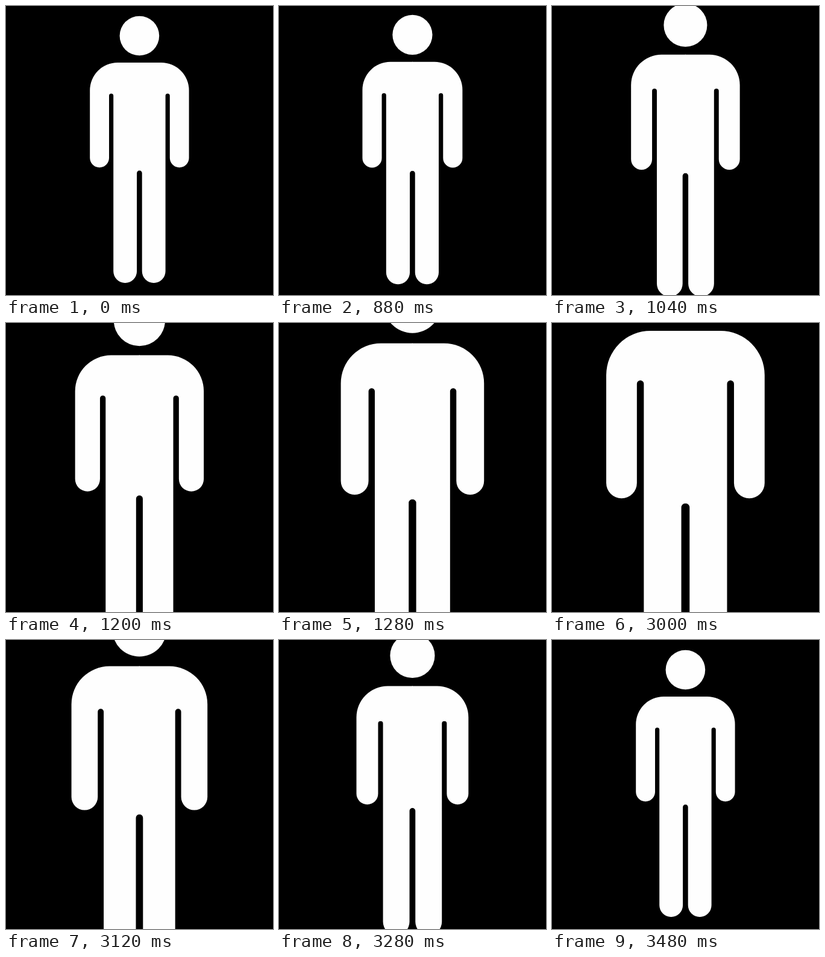
An HTML page with a canvas that plays this animation: 443x480 px, repeating every 4320 ms.

```html
<!DOCTYPE html>
<html lang="en">
<head>
<meta charset="utf-8">
<title>Figure zoom</title>
<style>
  html, body { margin: 0; width: 100%; height: 100%; overflow: hidden; background: #000; }
  canvas { display: block; width: 100vw; height: 100vh; }
</style>
</head>
<body>
<canvas id="stage" width="443" height="480"></canvas>
<script>
const canvas = document.getElementById('stage');
const ctx = canvas.getContext('2d');
const LOOP = 4320, STEP = 40, STEPS = 13;
const ZOOM_IN = 880, ZOOM_OUT = 3000;
const MAX_SCALE = 1.628;
const CENTER = { x: 221.4, y: 229.7 };

const easeIn = n => n >= STEPS ? 1 : Math.pow(0.08 + 0.0706 * n, 2.22);
const easeOut = n => n >= STEPS ? 1 : Math.sin((0.03 + 0.0789 * (n - 1)) * Math.PI / 2);

function zoomAt(time) {
  const t = Math.floor(time / STEP) * STEP;
  const stepsFrom = start => (t - start) / STEP + 1;
  if (t < ZOOM_IN) return 0;
  if (t < ZOOM_OUT) return easeIn(stepsFrom(ZOOM_IN));
  return 1 - easeOut(stepsFrom(ZOOM_OUT));
}

// Half of the body, mirrored by side; x is measured from the centre line.
function halfBody(side) {
  const arc = (x, y, r, from, to, ccw) =>
    side > 0 ? ctx.arc(x, y, r, from, to, ccw)
             : ctx.arc(-x, y, r, Math.PI - from, Math.PI - to, !ccw);
  const line = (x, y) => ctx.lineTo(side * x, y);
  const PI = Math.PI;

  ctx.beginPath();
  ctx.moveTo(-side * 0.5, 94.1);
  line(36.2, 94.1);
  arc(36.2, 140.1, 46, -PI / 2, 0, false);
  line(82.2, 252.3);
  arc(66.3, 252.3, 15.9, 0, PI, false);
  line(50.4, 149.2);
  arc(46.8, 149.2, 3.6, 0, PI, true);
  line(43.2, 440.6);
  arc(23.75, 440.6, 19.45, 0, PI, false);
  line(4.3, 277.6);
  arc(0, 277.6, 4.3, 0, -PI / 2, true);
  line(-0.5, 273.3);
  ctx.closePath();
  ctx.fill();
}

function draw(time) {
  const scale = 1 + (MAX_SCALE - 1) * zoomAt(time);
  ctx.setTransform(1, 0, 0, 1, 0, 0);
  ctx.fillStyle = '#000';
  ctx.fillRect(0, 0, canvas.width, canvas.height);
  ctx.setTransform(scale, 0, 0, scale, CENTER.x, CENTER.y * (1 - scale));
  ctx.fillStyle = '#fefefe';
  ctx.beginPath();
  ctx.arc(0, 49.5, 32.8, 0, Math.PI * 2);
  ctx.fill();
  halfBody(-1);
  halfBody(1);
}

const start = performance.now();
function tick() {
  draw((performance.now() - start) % LOOP);
  requestAnimationFrame(tick);
}
tick();
</script>
</body>
</html>
```
